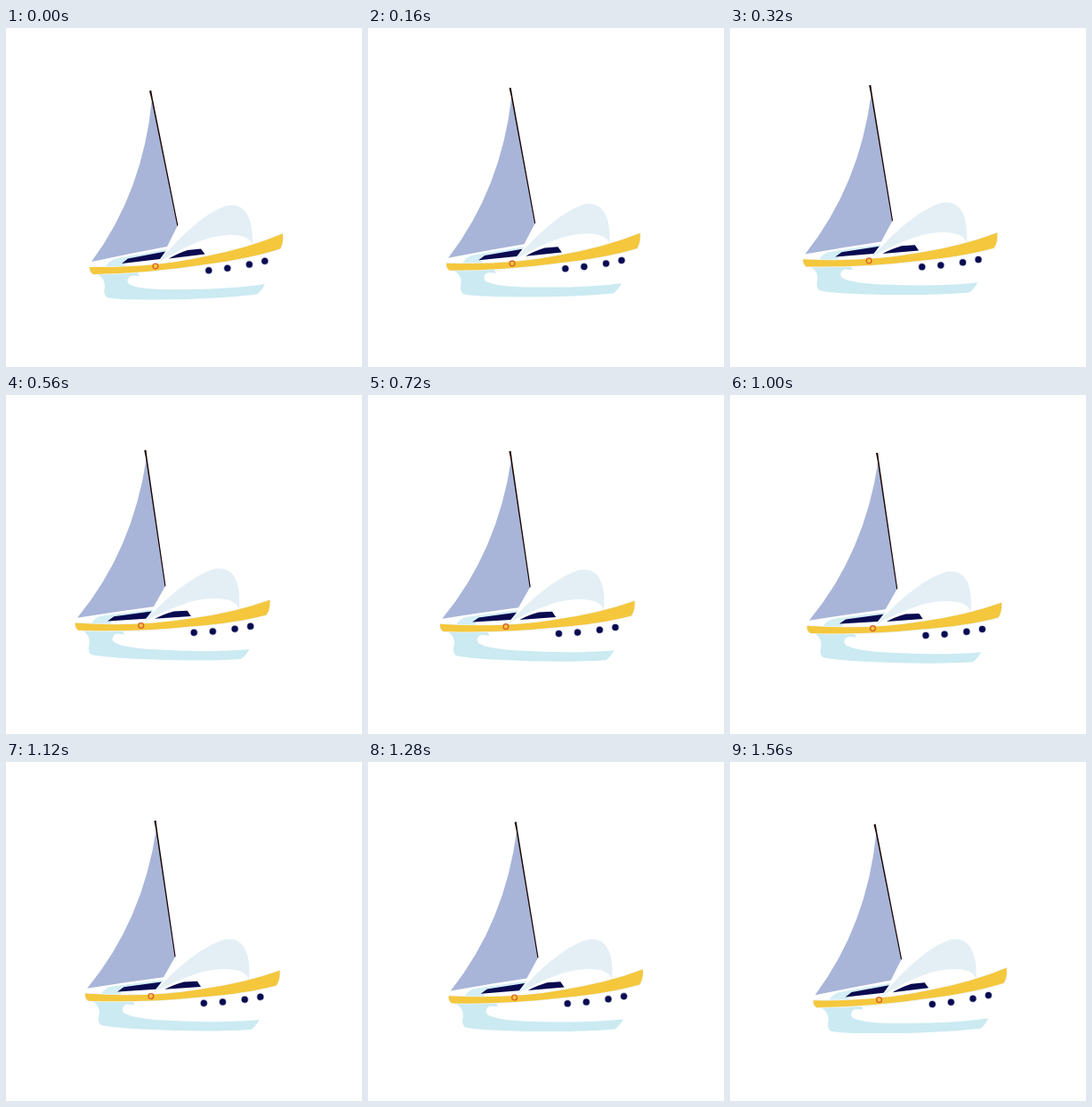
An HTML page for the animation above (1.6 s loop, 400x380 px).

```html
<!DOCTYPE html>
<html lang="en">
<head>
<meta charset="utf-8">
<title>Sailing boat</title>
<style>
  html, body { margin: 0; height: 100%; overflow: hidden; background: #fff; }
  svg { display: block; width: 100vw; height: 100vh; }
</style>
</head>
<body>
<svg viewBox="0 0 400 380">
  <g id="boat">
    <!-- mast and mainsail -->
    <path fill="#a8b5d8" d="M164 79L193 221L181 245Q138 253 96 262Q154.5 183 164 79Z"/>
    <path fill="#1c0804" d="M161 70.5L163.2 70L165 80L193.3 221L192.3 222L163.4 80Z"/>
    <!-- cabin -->
    <path fill="#d3eef4" d="M112 268Q115 260 126 258L181 248L173 262Q140 268 112 268Z"/>
    <path fill="#fff" d="M134 264L176 257L170 264L134 267.5Z"/>
    <path fill="#0a0a50" d="M130 264L137 258.5L179 250.5L173 259Z
                            M183 258.5Q192 253 204 249L219 247.5L223.5 253.5Z"/>
    <!-- jib -->
    <path fill="#e3eff5" d="M172 262C188 242 220 208 248 199C268 195 278 212 277 243
                            C272 227 238 231 218 239Q195 248 172 262Z"/>
    <!-- hull -->
    <path fill="#cbeaf2" d="M102 275.5Q112 281 111 291Q109 297 113 302Q122 304.5 160 304.5
                            Q230 304.5 282 298.5Q287 295 291 287Q250 293 195 293
                            Q150 294 138 287Q134 281 141 277.5L150 278L148 274Z"/>
    <path fill="#f4c73c" stroke="#f0f5f5" stroke-width="1.6" paint-order="stroke"
          d="M94 268Q165 269 222 256.5Q272 247 311 230.5Q312 241 308 247.5
             Q274 258.5 224 265Q160 275 98 276Q94 274 94 268Z"/>
    <circle cx="168" cy="267" r="2.9" fill="none" stroke="#d9652b" stroke-width="1.4"/>
    <g fill="#0a0a50" stroke="#a9aecb" stroke-width="1.6" paint-order="stroke">
      <circle cx="227.8" cy="271.7" r="3.5"/>
      <circle cx="248.8" cy="269.2" r="3.5"/>
      <circle cx="273.4" cy="265.1" r="3.5"/>
      <circle cx="290.8" cy="261.3" r="3.5"/>
    </g>
  </g>
</svg>
<script>
  const LOOP = 1600, STEP = 40;
  const PIVOT = '168 267';
  // time, x shift, y shift, tilt in degrees
  const poses = [
    [0, 0, 0, 0],
    [480, -17.8, -9.1, 3.05],
    [1120, -5.1, -4.5, 3.05],
    [LOOP, 0, 0, 0]
  ];
  const boat = document.getElementById('boat');

  function draw() {
    const t = Math.floor(performance.now() % LOOP / STEP) * STEP;
    const next = poses.findIndex(p => p[0] > t);
    const a = poses[next - 1], b = poses[next];
    const k = (t - a[0]) / (b[0] - a[0]);
    const [, x, y, tilt] = a.map((v, i) => v + (b[i] - v) * k);
    boat.setAttribute('transform', `translate(${x} ${y}) rotate(${tilt} ${PIVOT})`);
    requestAnimationFrame(draw);
  }
  draw();
</script>
</body>
</html>
```
